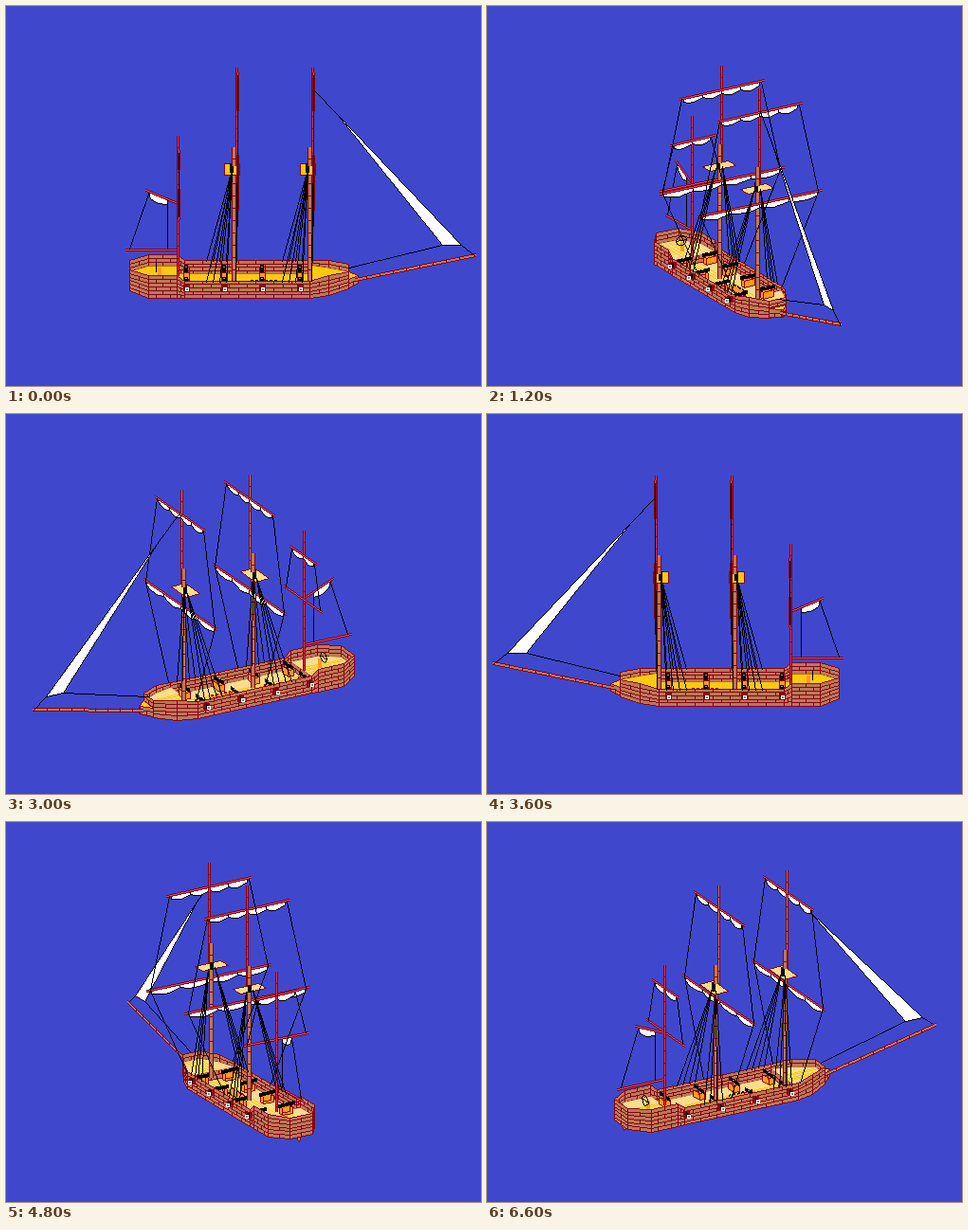
An HTML page with a canvas for the animation above (7200 ms loop, 501 by 401 pixels).

```html
<!DOCTYPE html>
<html lang="en">
<head>
<meta charset="utf-8">
<title>Turning ship</title>
<style>
html, body { margin: 0; width: 100%; height: 100%; overflow: hidden; background: #3f48cc; }
canvas { display: block; }
</style>
</head>
<body>
<canvas id="stage" width="501" height="401"></canvas>
<script>
const ctx = document.getElementById('stage').getContext('2d');
const SEA = '#3f48cc', WOOD = '#b97a57', DARK = '#880015', RED = '#d8344a', ROSE = '#c8505a',
      GOLD = '#ffc90e', CREAM = '#fbdc8c', ORANGE = '#ff9a1e', BLACK = '#000', WHITE = '#fff';
const CX = 250.5, TURN = 12, STEP = 600;

// Screen factors of the length and beam axes for a quarter turn.
const LEN = [[1, 0], [.91, .2], [.5, .3], [0, .4]];
const BEAM = [[0, -.4], [.535, -.37], [.91, -.195], [1, 0]];
let k = 0, L, B;

function setView(n) {
  k = n;
  const h = n % 6, flip = n < 6 ? 1 : -1;
  const m = h > 3 ? 6 - h : h, back = h > 3 ? -1 : 1;
  L = [LEN[m][0] * back * flip, LEN[m][1] * flip];
  B = [BEAM[m][0] * flip, BEAM[m][1] * back * flip];
}

// x along the ship, y across it, z downwards.
function at(x, y, z) {
  return [Math.round(CX + (x - CX) * L[0] + y * B[0]), Math.round(z + (x - CX) * L[1] + y * B[1])];
}

// Pixel line; its width is measured across the main direction.
function line(a, b, color = BLACK, w = 1) {
  let [x, y] = a;
  const [ex, ey] = b, o = w >> 1;
  const dx = Math.abs(ex - x), dy = -Math.abs(ey - y);
  const sx = x < ex ? 1 : -1, sy = y < ey ? 1 : -1;
  const steep = -dy > dx;
  let err = dx + dy;
  ctx.fillStyle = color;
  for (;;) {
    if (steep) ctx.fillRect(x - o, y, w, 1);
    else ctx.fillRect(x, y - o, 1, w);
    if (x === ex && y === ey) break;
    const e2 = 2 * err;
    if (e2 >= dy) { err += dy; x += sx; }
    if (e2 <= dx) { err += dx; y += sy; }
  }
}

function poly(pts, fill, edge) {
  ctx.fillStyle = fill;
  ctx.beginPath();
  pts.forEach(([x, y]) => ctx.lineTo(x + .5, y + .5));
  ctx.fill();
  if (edge) pts.forEach((p, i) => line(p, pts[(i + 1) % pts.length], edge));
}

function spar(a, b, w, core) {
  line(a, b, DARK, w);
  line(a, b, core, w - 2);
}

const mix = (a, b, t) => a + (b - a) * t;

// Half outline of the hull: x, half beam, rail, keel.
const half = [[130, 13, 273, 295], [150, 27, 273, 297], [180, 27, 273, 297], [188, 27, 279, 297],
              [320, 27, 279, 297], [340, 21, 276, 297], [361, 10, 276, 294]];
const hull = [...half.map(([x, y, r, q]) => [x, -y, r, q]), ...half.slice().reverse()];
const beak = [[361, -10, 284, 293], [371, -1, 284, 292], [371, 1, 284, 292], [361, 10, 284, 293]];
const deckAt = x => x < 184 ? 285 : x > 322 ? 284 : 293;

const faces = (a, b) => at(b[0], b[1], 0)[0] > at(a[0], a[1], 0)[0];

function wall(a, b, low) {
  const [za, zb] = low === undefined ? [a[3], b[3]] : [low, low];
  poly([at(a[0], a[1], a[2]), at(b[0], b[1], b[2]), at(b[0], b[1], zb), at(a[0], a[1], za)], WOOD, DARK);
  const rows = Math.max(2, Math.round((za - a[2]) / 4));
  const cols = Math.max(1, Math.round(Math.hypot(b[0] - a[0], b[1] - a[1]) / 20));
  const spot = (u, v) => at(mix(a[0], b[0], u), mix(a[1], b[1], u), mix(mix(a[2], b[2], u), mix(za, zb, u), v));
  for (let r = 0; r < rows; r++) {
    if (r) line(spot(0, r / rows), spot(1, r / rows), DARK);
    for (let c = 0; c < cols; c++) {
      const u = (c + (r % 2 ? .5 : 0)) / cols;
      line(spot(u, r / rows), spot(u, (r + 1) / rows), DARK);
    }
  }
}

function walls(front) {
  hull.forEach((a, i) => {
    const b = hull[(i + 1) % hull.length];
    if (faces(a, b) !== front) return;
    if (front) wall(a, b);
    else wall(a, b, deckAt((a[0] + b[0]) / 2));
  });
}

function deck(list, z) {
  const pts = [...list.map(([x, y]) => at(x, -y, z)), ...list.slice().reverse().map(([x, y]) => at(x, y, z))];
  poly(pts, k % 6 ? CREAM : GOLD);
  const [x0] = list[0], [x1] = list[list.length - 1];
  for (let y = -8; y <= 8; y += 4) line(at(x0 + 3, y, z), at(x1 - 3, y, z), GOLD);
}

function decks() {
  deck([[180, 27], [320, 27]], 293);
  if (L[1] > 0) wall([180, -27, 285], [180, 27, 285], 293);
  if (L[1] < 0) wall([320, -27, 284], [320, 27, 284], 293);
  deck([[130, 13], [150, 27], [180, 27]], 285);
  deck([[320, 27], [340, 21], [361, 10]], 284);
  if (k % 6) poly([at(258, -6, 293), at(288, -6, 293), at(288, 6, 293), at(258, 6, 293)], ORANGE);
  for (let x = 258; x < 288; x += 5) {
    line(at(x, -5, 292), at(x + 2, -5, 292), DARK, 2);
    line(at(x, 5, 292), at(x + 2, 5, 292), BLACK, 2);
  }
  const rim = [];
  for (let i = 0; i < 10; i++) {
    const t = i * Math.PI / 5;
    rim.push(at(158, 6 * Math.cos(t), 275 + 5 * Math.sin(t)));
  }
  line(at(162, 0, 276), at(162, 0, 285), ORANGE, 4);
  rim.forEach((p, i) => line(p, rim[(i + 1) % 10]));
  line(rim[0], rim[5]);
}

const gunX = [190, 230, 270, 310];

function guns(side) {
  const near = side * 10, far = side * 22;
  const panel = (xa, ya, xb, yb) =>
    poly([at(xa, ya, 285), at(xb, yb, 285), at(xb, yb, 292), at(xa, ya, 292)], ORANGE, DARK);
  for (const x of gunX) {
    panel(x - 3, near, x - 3, far);
    panel(x + 3, near, x + 3, far);
    panel(x - 3, near, x + 3, near);
    line(at(x, side * 7, 283), at(x, side * 25, 283), BLACK, 4);
    ctx.fillStyle = '#8c96a0';
    const [px, py] = at(x, side * 15, 282);
    ctx.fillRect(px - 1, py - 1, 2, 1);
  }
}

function muzzles(side) {
  for (const x of gunX) {
    const [px, py] = at(x, side * 27, 286), [ex, ey] = at(x, side * 31, 286);
    ctx.fillStyle = DARK;
    ctx.fillRect(px - 3, py - 3, 7, 7);
    line([px, py], [ex, ey], BLACK, 5);
    ctx.fillStyle = WHITE;
    ctx.fillRect(ex - 1, ey - 1, 4, 4);
    ctx.fillStyle = '#7f7f7f';
    ctx.fillRect(ex, ey, 2, 2);
  }
}

function bow() {
  poly(beak.map(([x, y, r]) => at(x, y, r)), GOLD, DARK);
  for (let i = 0; i < 3; i++) if (faces(beak[i], beak[i + 1])) wall(beak[i], beak[i + 1]);
  spar(at(368, 0, 289), at(495, 0, 263), 4, WOOD);
  for (let x = 380; x < 490; x += 14) {
    const [px, py] = at(x, 0, 289 - (x - 368) * .205);
    ctx.fillStyle = DARK;
    ctx.fillRect(px, py - 2, 1, 4);
  }
}

function pole(x, top, base, w, core) {
  spar(at(x, 0, top), at(x, 0, base), w, core);
  for (let z = top + 12; z < base; z += 13) {
    const [px, py] = at(x, 0, z);
    ctx.fillStyle = DARK;
    ctx.fillRect(px - (w >> 1), py, w, 1);
  }
}

function yard(x, z, reach, folds) {
  const s = reach - 5;
  for (let i = 0; i < folds; i++) {
    const y0 = mix(-s, s, i / folds), y1 = mix(-s, s, (i + 1) / folds), pts = [];
    for (const [t, d] of [[0, 0], [0, 4], [.25, 6], [.5, 7], [.75, 6], [1, 4], [1, 0]])
      pts.push(at(x, mix(y0, y1, t), z + d));
    if (k % 6) poly(pts, WHITE, BLACK);
  }
  spar(at(x, -reach, z), at(x, reach, z), 3, ROSE);
}

function mast(x) {
  const core = k % 2 ? WOOD : RED;
  const poles = () => {
    pole(x + 3, 65, 174, 3, core);
    pole(x, 149, 290, 5, WOOD);
    poly([at(x - 10, -15, 172), at(x + 6, -15, 172), at(x + 6, 15, 172), at(x - 10, 15, 172)],
         k % 6 ? CREAM : GOLD, DARK);
    line(at(x - 2, 0, 166), at(x - 2, 0, 175), BLACK, 4);
    pole(x, 149, 168, 5, WOOD);
  };
  const yards = () => {
    yard(x + 4, 90, 49, 4);
    yard(x + 4, 186, 72, 4);
  };
  if (L[1] < 0) { yards(); poles(); } else { poles(); yards(); }
}

function mizzen() {
  spar(at(181, 0, 257), at(126, 0, 257), 3, ROSE);
  line(at(150, 0, 198), at(130, 0, 256));
  line(at(170, 0, 206), at(170, 0, 256));
  poly([at(150, 0, 196), at(152, 0, 203), at(160, 0, 208), at(170, 0, 209), at(170, 0, 204)], WHITE, BLACK);
  spar(at(181, 0, 208), at(147, 0, 194), 3, ROSE);
  const yards = () => {
    yard(182, 162, 26, 2);
    yard(182, 208.5, 38, 0);
  };
  if (L[1] < 0) yards();
  pole(181, 137, 284, 3, RED);
  if (L[1] >= 0) yards();
}

function rigging() {
  for (const side of [-1, 1]) {
    for (const x of [240, 320]) {
      line(at(x + 4, side * 46, 91), at(x + 4, side * 68, 186));
      line(at(x + 4, side * 68, 187), at(x + 2, side * 27, 279));
      for (let i = 0; i < 4; i++) line(at(x - 2, side * 4, 174), at(x - 29 + i * 7, side * 27, 280));
    }
    line(at(182, side * 22, 164), at(182, side * 34, 208));
  }
}

function jib() {
  line(at(325, 0, 89), at(349, 0, 114));
  line(at(480, 0, 252), at(494, 0, 263));
  line(at(460, 0, 252), at(361, 0, 276));
  poly([at(349, 0, 114), at(460, 0, 252), at(480, 0, 252)], WHITE, BLACK);
}

function draw() {
  ctx.fillStyle = SEA;
  ctx.fillRect(0, 0, 501, 401);
  const far = B[1] > 0 ? -1 : 1, away = L[1] < 0;
  const masts = [mizzen, () => mast(240), () => mast(320)];
  if (away) { jib(); bow(); masts.reverse(); }
  poly([at(130, 0, 295), at(134, 0, 302), at(139, 0, 300)], WOOD, DARK);
  walls(false);
  decks();
  guns(far);
  guns(-far);
  masts.forEach(m => m());
  walls(true);
  if (B[1]) muzzles(-far);
  rigging();
  if (!away) { bow(); jib(); }
}

let shown = -1;
function tick() {
  const n = Math.floor(performance.now() / STEP) % TURN;
  if (n !== shown) {
    shown = n;
    setView(n);
    draw();
  }
  requestAnimationFrame(tick);
}
tick();
</script>
</body>
</html>
```
